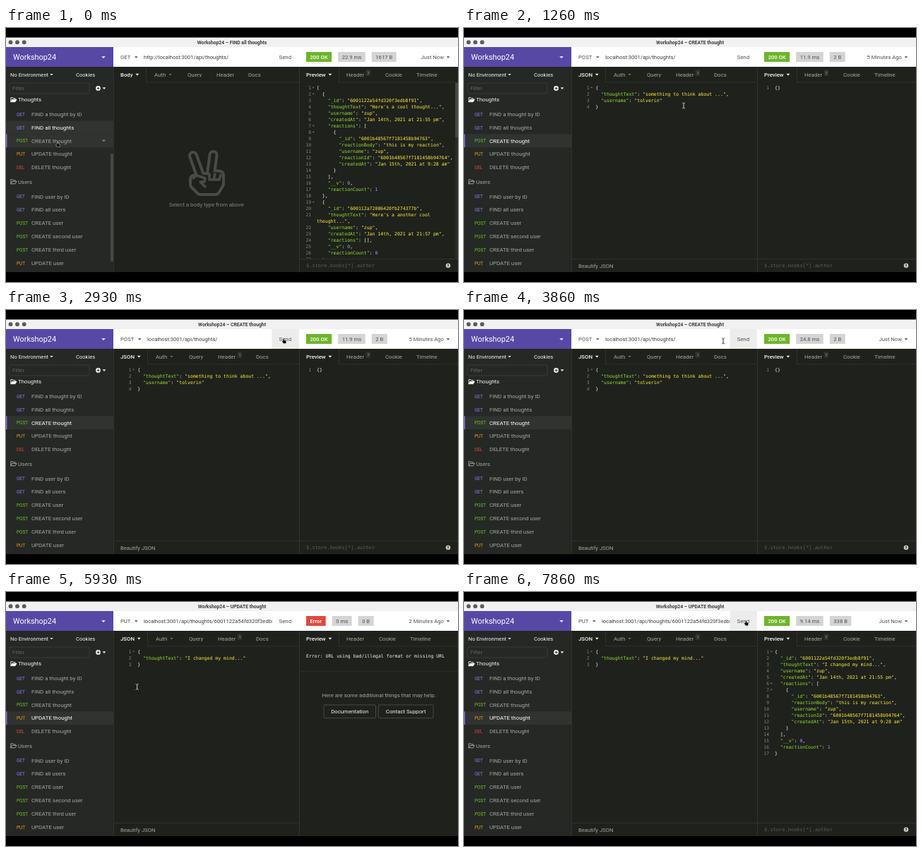
Write an HTML page with a canvas that moves like this. It is 640x360 px and loops after 8000 ms.

```html
<!DOCTYPE html>
<html lang="en">
<head>
<meta charset="utf-8">
<title>API client</title>
<style>
  html, body { margin: 0; width: 100%; height: 100%; overflow: hidden; background: #000; }
  canvas { display: block; width: 640px; height: 360px; }
</style>
</head>
<body>
<canvas id="stage" width="640" height="360"></canvas>
<script>
const ctx = document.getElementById('stage').getContext('2d');
const LOOP = 8000;
const PROJECT = 'Workshop24';
const SANS = 'Roboto, sans-serif';
const MONO = '"DejaVu Sans Mono", monospace';
const C = {
  pane: '#1f211d', side: '#252824', row: '#30332f', line: '#383935', thumb: '#464844',
  text: '#a6a7a3', dim: '#858681', white: '#f4f4f2', purple: '#5848a5', ink: '#505050',
  GET: '#8b7cf0', POST: '#6fc32c', PUT: '#f09a25', DEL: '#dd4b3e',
  key: '#93e035', string: '#fbf03c', number: '#a893f5'
};

// ---- drawing helpers ----
function rect(x, y, w, h, color) {
  ctx.fillStyle = color;
  ctx.fillRect(x, y, w, h);
}
function outline(x, y, w, h, r, color) {
  ctx.beginPath();
  ctx.roundRect(x, y, w, h, r);
  ctx.strokeStyle = color;
  ctx.lineWidth = 0.7;
  ctx.stroke();
}
function disc(x, y, r, color) {
  ctx.beginPath();
  ctx.arc(x, y, r, 0, 7);
  ctx.fillStyle = color;
  ctx.fill();
}
function text(s, x, y, color, { size = 7.85, weight = 400, font = SANS, align = 'left' } = {}) {
  ctx.font = `${weight} ${size}px ${font}`;
  ctx.textAlign = align;
  ctx.fillStyle = color;
  ctx.fillText(s, x, y + size * 0.355);
  return ctx.measureText(s).width;
}
function caret(x, y, color, r = 2.6) {
  ctx.beginPath();
  ctx.moveTo(x - r, y - r * 0.5);
  ctx.lineTo(x + r, y - r * 0.5);
  ctx.lineTo(x, y + r * 0.6);
  ctx.fillStyle = color;
  ctx.fill();
}
function trace(points, color, width) {
  ctx.beginPath();
  points.forEach(([x, y]) => ctx.lineTo(x, y));
  ctx.strokeStyle = color;
  ctx.lineWidth = width;
  ctx.lineCap = ctx.lineJoin = 'round';
  ctx.stroke();
}
function clipped(x, y, w, h, draw) {
  ctx.save();
  ctx.beginPath();
  ctx.rect(x, y, w, h);
  ctx.clip();
  draw();
  ctx.restore();
}

// ---- content ----
const reaction = `"reactions": [
  {
    "_id": "6001b48567f7181458b94763",
    "reactionBody": "this is my reaction",
    "username": "zup",
    "reactionId": "6001b48567f7181458b94764",
    "createdAt": "Jan 15th, 2021 at 9:28 am"
  }
],
"__v": 0,
"reactionCount": 1`;
const indent = (s, n) => s.replace(/^/gm, ' '.repeat(n));
const thought = words => `{
  "_id": "6001122a54fd320f3edb8f91",
  "thoughtText": "${words}",
  "username": "zup",
  "createdAt": "Jan 14th, 2021 at 21:55 pm",
${indent(reaction, 2)}
}`;
// A leading "~" marks the wrapped rest of a string.
const allThoughts = `[
${indent(thought("Here's a cool thought..."), 2)},
  {
    "_id": "600112a72086420fb274377b",
    "thoughtText": "Here's a another cool
~thought...",
    "username": "zup",
    "createdAt": "Jan 14th, 2021 at 21:57 pm",
    "reactions": [],
    "__v": 0,
    "reactionCount": 0
  },`;
const createBody = `{
  "thoughtText": "something to think about ...",
  "username": "tolverin"
}`;
const updateBody = `{
  "thoughtText": "I changed my mind..."
}`;
const URL_PATH = 'localhost:3001/api/thoughts/';

const rows = [
  ['GET', 'FIND a thought by ID', 122], ['GET', 'FIND all thoughts', 141],
  ['POST', 'CREATE thought', 159.8], ['PUT', 'UPDATE thought', 178.7],
  ['DEL', 'DELETE thought', 197.6], ['GET', 'FIND user by ID', 238.8],
  ['GET', 'FIND all users', 257.6], ['POST', 'CREATE user', 276.4],
  ['POST', 'CREATE second user', 295.3], ['POST', 'CREATE third user', 314.2],
  ['PUT', 'UPDATE user', 333]
];

const findAll = { row: 1, url: 'http://' + URL_PATH };
const create = { row: 2, url: URL_PATH, body: createBody };
const update = { row: 3, url: URL_PATH + '6001122a54fd320f3edb8f91', body: updateBody };
const ok = (time, size, age, json) => ({ time, size, age, json });
const scenes = [
  [0, findAll, ok('22.9 ms', '1617 B', 'Just Now', allThoughts)],
  [200, create, ok('11.9 ms', '2 B', '5 Minutes Ago', '{}')],
  [3130, create, ok('24.8 ms', '2 B', 'Just Now', '{}')],
  [5260, update, { time: '0 ms', size: '0 B', age: '2 Minutes Ago',
    error: 'Error: URL using bad/illegal format or missing URL' }],
  [7400, update, ok('9.14 ms', '338 B', 'Just Now', thought('I changed my mind...'))]
];

// ---- pointer ----
const path = [
  [0, 74, 165], [200, 74, 165], [1000, 307, 108], [1260, 311, 110], [1400, 311, 110],
  [1700, 386, 46], [1840, 386, 46], [2130, 370.5, 63], [2660, 372, 61], [2800, 394, 44],
  [3530, 395, 43], [3660, 395, 43], [3860, 367, 44], [4060, 365, 45], [4930, 78, 178],
  [5200, 72, 181], [5500, 72, 181], [6530, 372, 58], [6680, 396, 45], [6930, 400, 44], [LOOP, 400, 44]
];
function pointerAt(t) {
  const i = path.findIndex(p => p[0] > t);
  const [t0, x0, y0] = path[i - 1], [t1, x1, y1] = path[i];
  const u = (t - t0) / (t1 - t0), e = u * u * (3 - 2 * u);
  return { x: x0 + (x1 - x0) * e, y: y0 + (y1 - y0) * e };
}
const overSend = p => p.x > 377 && p.x < 415 && p.y > 27 && p.y < 55;

function drawPointer({ x, y }, hasEditor) {
  const inUrl = y > 27 && y < 55 && x > 190 && x < 377;
  const inEditor = hasEditor && y > 77 && y < 327 && x > 184 && x < 415;
  if (inUrl || inEditor) {
    const color = inUrl ? '#333' : '#cfcfcc';
    trace([[x, y - 3], [x, y + 3]], color, 1);
    for (const s of [-1, 1]) trace([[x - 1.8, y + 4 * s], [x, y + 3 * s], [x + 1.8, y + 4 * s]], color, 0.8);
    return;
  }
  const finger = [[x - 1, y - 3], [x - 1, y + 1]];
  const palm = [[x - 2.4, y + 0.6], [x - 0.8, y + 2.9], [x + 1.6, y + 2.9], [x + 2, y + 0.2], [x - 0.8, y - 0.4]];
  for (const [color, extra] of [['#d0d0d0', 1], ['#0a0a0a', 0]]) {
    trace(finger, color, 1.1 + extra);
    trace(palm, color, 1.1 + extra);
    ctx.fillStyle = color;
    ctx.fill();
  }
}

// ---- panels ----
function drawFolder(y, name, color) {
  trace([[6.8, y + 3], [6.8, y - 3], [9.5, y - 3], [10.3, y - 2], [13, y - 2], [13, y - 0.5]], color, 0.9);
  trace([[6.8, y + 3], [8.6, y - 0.4], [15, y - 0.4], [13, y + 3], [6.8, y + 3]], color, 0.9);
  if (color === C.white) { ctx.fillStyle = color; ctx.fill(); }
  text(name, 17, y, color);
}

function drawSidebar(active, pointer) {
  rect(0, 27, 152, 319, C.side);
  rect(0, 27, 152, 28, C.purple);
  text(PROJECT, 10, 41.3, '#fff', { size: 10.9 });
  caret(138, 41.5, '#ddd8f5', 2.8);
  text('No Environment', 6, 66, C.white, { size: 7.6 });
  caret(64.5, 66, C.white, 2.2);
  text('Cookies', 99, 66, C.white, { size: 7.6 });
  outline(5, 78, 113, 15, 1.5, '#40423e');
  text('Filter', 9, 85.5, '#656662', { size: 7.6 });
  disc(130.5, 85.5, 3.4, C.white);
  trace([[128.8, 85.5], [132.2, 85.5]], C.side, 0.9);
  trace([[130.5, 83.8], [130.5, 87.2]], C.side, 0.9);
  caret(139, 85.5, C.white, 2.3);

  drawFolder(101.7, 'Thoughts', C.white);
  drawFolder(217.8, 'Users', C.text);
  const inside = pointer.x < 152;
  const hovered = inside ? rows.findIndex(r => Math.abs(pointer.y - r[2]) < 9.4) : -1;
  const marked = hovered < 0 ? active : hovered;
  rows.forEach(([method, name, y], i) => {
    if (i === active || i === hovered) rect(0, y - 9.4, 152, 18.8, C.row);
    if (i === marked) rect(0, y - 9.4, 1.5, 18.8, '#7d6be0');
    text(method, 15, y + 0.3, C[method], { size: 6.4 });
    text(name, 36, y, i === active ? '#fff' : C.text);
    if (i === hovered) caret(138.5, y, C.dim, 2.5);
  });
  if (inside) rect(148, 178, 4, 153, C.thumb);
}

function drawCode(source, numberX, codeX) {
  const size = 6.53, step = size * 0.602;
  let number = 0;
  source.split('\n').forEach((raw, i) => {
    const y = 84.4 + i * 9.03;
    const wrapped = raw[0] === '~';
    const line = wrapped ? raw.slice(1) : raw;
    const put = (s, col, color) => text(s, codeX + col * step, y, color, { size, font: MONO });
    if (!wrapped) text(++number, numberX, y, C.dim, { size: 6.3, font: MONO, align: 'right' });
    if (/[[{]$/.test(line)) caret(numberX + 3.2, y, C.dim, 1.5);
    if (wrapped) {
      put(line.slice(0, -1), 0, C.string);
      put(line.slice(-1), line.length - 1, C.white);
      return;
    }
    for (const m of line.matchAll(/"[^"]*"?|\d+|[^\s"\d]+/g)) {
      const isKey = line[m.index + m[0].length] === ':';
      const color = m[0][0] === '"' ? (isKey ? C.key : C.string) : /\d/.test(m[0]) ? C.number : C.white;
      put(m[0], m.index, color);
    }
  });
}

// The first tab is open: it has a right border and no underline.
function drawTabs(tabs, left, right, openEnd) {
  rect(openEnd, 76.5, right - openEnd, 0.7, C.line);
  rect(openEnd, 55, 0.7, 22, C.line);
  tabs.forEach(([name, x, mark], i) => {
    const color = i ? C.text : C.white;
    const w = text(name, x, 66, color, { size: 7.8, weight: i ? 400 : 500 });
    if (mark === 'menu') caret(x + w + 6.3, 66, i ? '#777873' : color, i ? 2 : 2.4);
    else if (mark) {
      rect(x + w + 2.5, 59.3, 6.5, 8.5, '#30322e');
      text(mark, x + w + 5.8, 63.7, C.text, { size: 5.3, align: 'center' });
    }
  });
}

function drawPeaceHand() {
  const gray = '#4a4b47';
  const shapes = [
    [[265, 181], [275, 209]], [[293.5, 180], [290, 207]],
    [[266, 214], [276, 211], [303, 212], [303, 221], [297, 231], [275, 231], [266, 222], [266, 214]],
    [[296, 207], [303, 208]]
  ];
  for (const [color, width] of [[gray, 14], [C.pane, 6]]) {
    shapes.forEach(s => {
      trace(s, color, width);
      if (s.length > 3) { ctx.fillStyle = color; ctx.fill(); }
    });
  }
  trace([[265, 213], [270, 209], [282, 213], [281, 218], [275, 218], [282, 225]], gray, 3.5);
  trace([[288, 207], [288, 215], [294, 215], [296, 207]], gray, 3.5);
  trace([[296, 215], [302, 215], [304, 208]], gray, 3.5);
}

function drawRequest({ row, url, body }, sendHover) {
  rect(152, 27, 263, 319, C.pane);
  rect(152, 27, 263, 28, '#fff');
  const method = rows[row][0];
  const start = method === 'POST' ? 200 : 195;
  text(method, 162, 41.3, C.ink, { size: 7.7 });
  caret(start - 10.7, 41.3, C.ink, 2.3);
  clipped(start, 27, 377 - start, 28, () => text(url, start, 41.3, '#3c3c3c', { size: 7.58 }));
  if (sendHover) rect(376.5, 27, 38.5, 28, '#ececec');
  text('Send', 386.5, 41.3, C.ink, { size: 7.9 });

  if (body) {
    drawTabs([['JSON', 162, 'menu'], ['Auth', 212, 'menu'], ['Query', 259], ['Header', 300, '1'], ['Docs', 354]], 152, 415, 200);
    drawCode(body, 177.5, 186.3);
    rect(152, 327, 263, 0.7, C.line);
    text('Beautify JSON', 162, 336.8, C.text, { size: 7.7 });
  } else {
    drawTabs([['Body', 162, 'menu'], ['Auth', 210, 'menu'], ['Query', 257], ['Header', 298], ['Docs', 343]], 152, 415, 198);
    drawPeaceHand();
    text('Select a body type from above', 284, 249.8, C.dim, { size: 7.92, align: 'center' });
  }
}

function drawBadge(label, x, fill, color, weight) {
  ctx.font = `${weight} 7.7px ${SANS}`;
  const w = ctx.measureText(label).width + 11;
  rect(x, 34, w, 14, fill);
  text(label, x + w / 2, 41.2, color, { size: 7.7, weight, align: 'center' });
  return x + w + 9;
}

function drawResponse({ time, size, age, json, error }) {
  rect(415, 27, 225, 319, C.pane);
  rect(415, 27, 225, 28, '#fff');
  let x = drawBadge(error ? 'Error' : '200 OK', 425, error ? '#dd4a41' : '#6db52b', '#fff', 500);
  x = drawBadge(time, x, '#d4d4d4', C.ink, 400);
  drawBadge(size, x, '#d4d4d4', C.ink, 400);
  text(age, 620, 41.3, C.ink, { size: 7.7, align: 'right' });
  caret(626, 41.3, C.ink, 2.3);

  const shift = error ? 9 : 0;
  drawTabs([['Preview', 425, 'menu'], ['Header', 482, error ? '' : '7'],
    ['Cookie', 537 - shift], ['Timeline', 581 - shift]], 415, 640, 471);
  if (error) {
    text(error, 425, 91, C.white, { size: 6.53, font: MONO });
    rect(415, 112.5, 225, 0.7, C.line);
    text('Here are some additional things that may help.', 528, 146, C.text, { size: 7.8, align: 'center' });
    for (const [label, left, w] of [['Documentation', 450, 73.5], ['Contact Support', 527.3, 77.7]]) {
      outline(left, 160, w, 18.7, 1.5, '#5a5b57');
      text(label, left + w / 2, 169.5, C.white, { size: 7.8, align: 'center' });
    }
  } else {
    clipped(415, 78, 225, 248.5, () => drawCode(json, 432, 440));
    if (json === allThoughts) {
      rect(636, 77, 4, 250, '#2a2c28');
      rect(636, 78, 4, 77, C.thumb);
    }
    rect(415, 327, 225, 0.7, C.line);
    text('$.store.books[*].author', 425, 336.8, '#5c5d58', { size: 7, font: MONO });
    disc(626, 336.8, 3.3, '#c9c9c6');
    text('?', 626, 336.9, C.pane, { size: 5.8, weight: 700, align: 'center' });
  }
  rect(415, 55, 0.8, 291, C.line);
}

function drawTitleBar(row) {
  rect(0, 13.5, 640, 13.5, '#f1f1f1');
  [6.5, 16, 25.7].forEach(x => disc(x, 20.2, 2.9, '#5b5b5b'));
  text(`${PROJECT} – ${rows[row][1]}`, 320, 20.2, '#3b3b3b', { size: 6.75, weight: 700, align: 'center' });
}

function draw(t) {
  const [, request, response] = scenes.findLast(s => s[0] <= t);
  const pointer = pointerAt(t);
  // The button highlight fades a moment after the pointer leaves.
  const sendHover = overSend(pointer) || overSend(pointerAt(Math.max(0, t - 140)));
  rect(0, 0, 640, 360, '#000');
  drawTitleBar(request.row);
  drawSidebar(request.row, pointer);
  drawRequest(request, sendHover);
  drawResponse(response);
  rect(152, 55, 0.7, 291, C.line);
  rect(0, 346, 640, 14, '#000');
  drawPointer(pointer, request.body);
}

const begin = performance.now();
function tick() {
  draw((performance.now() - begin) % LOOP);
  requestAnimationFrame(tick);
}
tick();
</script>
</body>
</html>
```
